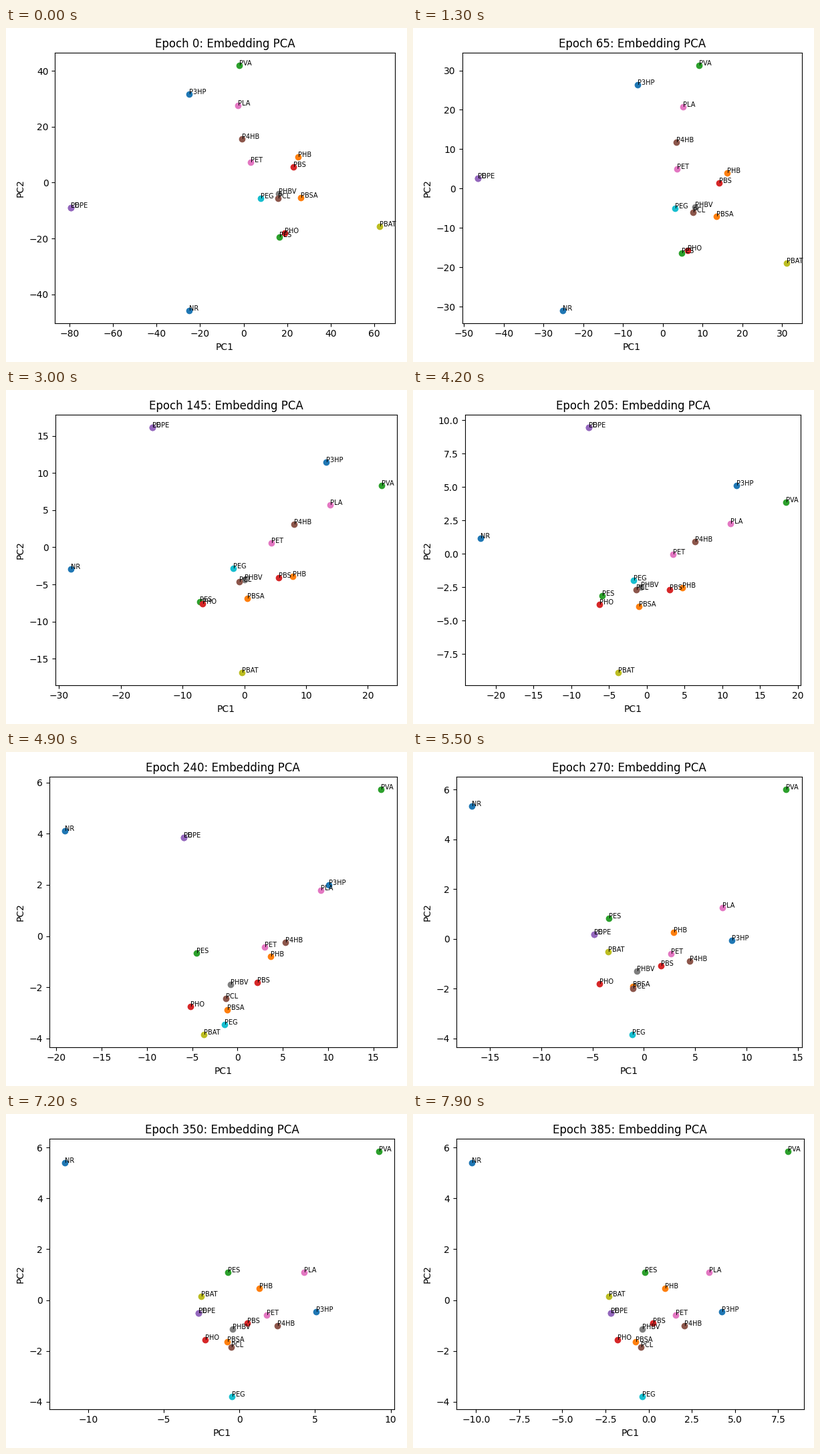
A matplotlib script for the animation above (8000 ms loop, 600x500 px).

```python
import numpy as np
import matplotlib.pyplot as plt
from matplotlib.animation import FuncAnimation

FRAMES, INTERVAL = 80, 100
LAST = FRAMES - 1

# Start (x, y) and end (x, y) of each label, in colour-cycle order.
POSES = {
    "P3HP": (-25, 31.7, 4.25, -0.45),
    "PHB": (25.1, 9.2, 0.96, 0.45),
    "PVA": (-2, 42, 8.08, 5.85),
    "PBS": (22.9, 5.6, 0.26, -0.9),
    "PE": (-79.5, -9, -2.2, -0.5),
    "P4HB": (-0.65, 15.7, 2.08, -1),
    "PLA": (-2.6, 27.6, 3.5, 1.1),
    "PHBV": (16.2, -3.9, -0.38, -1.14),
    "PBAT": (62.3, -15.7, -2.29, 0.15),
    "PEG": (7.9, -5.6, -0.36, -3.8),
    "NR": (-25, -45.9, -10.23, 5.4),
    "PBSA": (26.3, -5.4, -0.74, -1.65),
    "PES": (16.5, -19.5, -0.2, 1.1),
    "PHO": (18.9, -18.2, -1.79, -1.55),
    "LDPE": (-79.5, -9, -2.2, -0.5),
    "PCL": (15.8, -5.6, -0.43, -1.85),
    "PET": (3.3, 7.3, 1.58, -0.6),
}
X0, Y0, X1, Y1 = np.array(list(POSES.values())).T


def turn(k, degrees, pace, power):
    """Angle that eases from zero up to a limit."""
    return np.radians(degrees) * (1 - np.exp(-(k / pace) ** power))


def positions(k):
    """The start pose shrinks and rotates while the end pose takes over."""
    u = k / LAST
    a = turn(k, 72, 24, 2.8)
    b = turn(k, 80, 23, 2.5)
    px = X0 * (1 - u) * np.exp(-k / 34)
    py = Y0 * (1 - u) ** 1.42
    x = px * np.cos(a) + py * np.sin(b) + X1 * u * u * (3 - 2 * u)
    # The second axis swaps direction quickly, a little after half way.
    swap = np.pi / 2 / (1 + np.exp((48.5 - k) / 3))
    y = (py * np.cos(b) - px * np.sin(a)) * np.cos(swap) + Y1 * np.sin(swap)
    return x, y


fig = plt.figure(figsize=(6, 5), dpi=100)


def draw(k):
    fig.clear()
    fig.subplots_adjust(left=0.125, right=0.9, bottom=0.11, top=0.88)
    ax = fig.add_subplot()
    for name, x, y in zip(POSES, *positions(k)):
        ax.scatter(x, y)
        ax.text(x, y, name, fontsize=7)
    ax.set_title(f"Epoch {5 * round(0.975 * k)}: Embedding PCA")
    ax.set_xlabel("PC1")
    ax.set_ylabel("PC2")
    fig.tight_layout()
    return ax.collections


anim = FuncAnimation(fig, draw, frames=FRAMES, interval=INTERVAL,
                     repeat=True, repeat_delay=0, blit=False)
plt.show()
```
